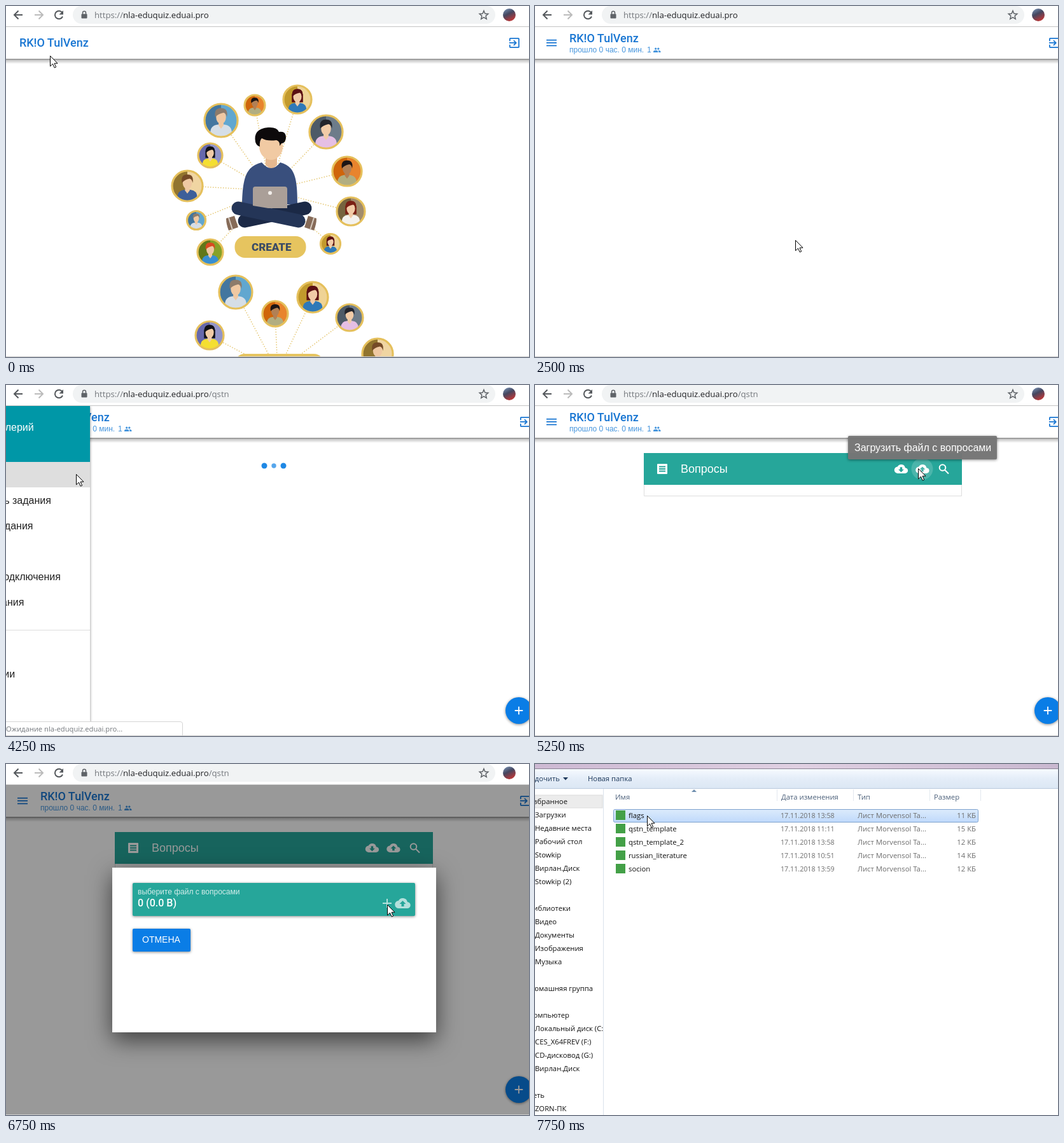
Recreate the animation shown at these times as an HTML page. Size 822 by 552 pixels, loop 8000 ms.

```html
<!DOCTYPE html>
<html lang="ru">
<head>
<meta charset="utf-8">
<title>Quiz walkthrough</title>
<style>
  html, body { margin: 0; width: 100%; height: 100%; overflow: hidden; background: #fff; }
  svg { display: block; width: 822px; height: 552px; }
  text { font: 16px "Liberation Sans", Arial, sans-serif; }
  .rob { font-family: Roboto, sans-serif; font-weight: 500; }
  .title { font-size: 18px; fill: #1976d2; }
  .small { font-size: 12px; }
  .url { font: 13.2px "Open Sans", sans-serif; fill: #74787d; }
  .win text { font: 11.3px "Open Sans", sans-serif; }
  .blue { fill: #1976d2; }
  .white { fill: #fff; }
  .teal { fill: #26a69a; }
  .btn { fill: #0a7de6; }
  .lift { filter: drop-shadow(0 1px 2px #0007); }
  .float { filter: drop-shadow(0 12px 18px #0009); }
  .line { fill: none; stroke-width: 2; }
</style>
</head>
<body>
<svg id="stage" viewBox="0 0 822 552">
  <defs>
    <linearGradient id="shade" x2="0" y2="1"><stop stop-color="#000" stop-opacity=".5"/><stop offset=".3" stop-color="#000" stop-opacity=".22"/><stop offset="1" stop-color="#000" stop-opacity="0"/></linearGradient>
    <linearGradient id="photo" x2=".5" y2="1"><stop stop-color="#7d9cc0"/><stop offset=".5" stop-color="#45465f"/><stop offset="1" stop-color="#b5383a"/></linearGradient>
    <linearGradient id="bar" x2="0" y2="1"><stop stop-color="#f6faff"/><stop offset=".5" stop-color="#e4edf8"/><stop offset="1" stop-color="#dce7f4"/></linearGradient>
    <linearGradient id="pick" x2="0" y2="1"><stop stop-color="#dcebfc"/><stop offset="1" stop-color="#bfd9fb"/></linearGradient>
    <linearGradient id="strip"><stop stop-color="#cdb9d3"/><stop offset=".5" stop-color="#e0d0e2"/><stop offset="1" stop-color="#c9b8d0"/></linearGradient>
    <path id="menu" d="M3 18h18v-2H3zm0-5h18v-2H3zm0-7v2h18V6z"/>
    <path id="exit" d="M10.1 15.6 11.5 17l5-5-5-5-1.4 1.4L12.7 11H3v2h9.7zM19 3H5a2 2 0 0 0-2 2v4h2V5h14v14H5v-4H3v4a2 2 0 0 0 2 2h14a2 2 0 0 0 2-2V5a2 2 0 0 0-2-2z"/>
    <path id="up" d="M19.4 10A7.5 7.5 0 0 0 5.4 8 6 6 0 0 0 6 20h13a5 5 0 0 0 .4-10zM14 13v4h-4v-4H7l5-5 5 5z"/>
    <path id="down" d="M19.4 10A7.5 7.5 0 0 0 5.4 8 6 6 0 0 0 6 20h13a5 5 0 0 0 .4-10zM17 13l-5 5-5-5h3V9h4v4z"/>
    <path id="plus" d="M19 13h-6v6h-2v-6H5v-2h6V5h2v6h6z"/>
    <g id="people"><circle cx="8" cy="8" r="3"/><circle cx="16" cy="8" r="3"/><path d="M1 19v-2.5c0-4.6 14-4.6 14 0V19zM17 19v-3q0-1.5-1.5-3c3 0 7.500 1 7.500 3.500V19z"/></g>
    <g id="exitIcon" class="blue"><use href="#exit" transform="translate(-10.700 -10.700) scale(.89)"/></g>
  </defs>

  <rect width="822" height="552" fill="#fff"/>

  <g data-on="0 8">
    <g id="home"></g>
    <rect y="33" width="822" height="50" fill="#fff"/>
    <rect y="83" width="822" height="8" fill="url(#shade)"/>
    <text class="rob title" x="21" y="64">RK!O TulVenz</text>
    <use href="#exitIcon" x="799" y="58"/>
  </g>

  <g data-on="9 27">
    <rect y="83" width="822" height="8" fill="url(#shade)"/>
    <use class="blue" href="#menu" transform="translate(15.300 47.300) scale(.89)"/>
    <text class="rob title" x="54" y="57">RK!O TulVenz</text>
    <g fill="#4796dd">
      <text class="small" x="54" y="73">прошло 0 час. 0 мин.</text>
      <text class="small" x="176" y="73">1</text>
      <use href="#people" transform="translate(185.500 63) scale(.52)"/>
    </g>
    <use href="#exitIcon" x="816" y="58"/>
  </g>

  <g data-on="17 17" fill="#1e88e5">
    <circle cx="406" cy="127" r="4.500"/><circle cx="421" cy="127" r="3.700" opacity=".75"/><circle cx="436" cy="127" r="4.500"/>
  </g>

  <g data-on="18 27">
    <path d="M171.500 157v17.500h499V157" fill="#fff" stroke="#ddd"/>
    <rect class="teal" x="171" y="107" width="500" height="50"/>
    <g class="white">
      <rect x="192" y="124" width="16" height="16" rx="1"/>
      <path class="line" stroke="#26a69a" d="M195 128.500h10m-10 3.500h10m-10 3.500h10"/>
      <text x="229" y="138" style="font-size:18px">Вопросы</text>
      <circle data-on="20 22" cx="608.500" cy="132" r="17" opacity=".17"/>
      <use href="#down" transform="translate(565 121.500) scale(.87)"/>
      <use href="#up" transform="translate(598.500 121.500) scale(.87)"/>
    </g>
    <path class="line" stroke="#fff" d="M644 133.500l6 6"/>
    <circle class="line" stroke="#fff" cx="640.500" cy="130" r="4.800"/>
  </g>

  <g data-on="17 27">
    <circle class="btn lift" cx="806" cy="512" r="21"/>
    <use class="white" href="#plus" transform="translate(795.200 501.200) scale(.9)"/>
  </g>

  <g data-on="21 22">
    <rect class="lift" x="492" y="80" width="234" height="37" rx="2" fill="#777" fill-opacity=".96"/>
    <text class="white" x="502" y="104">Загрузить файл с вопросами</text>
  </g>

  <rect id="veil" y="33" width="822" height="519"/>

  <g id="modal">
    <rect class="float" x="167" y="163" width="509" height="259" fill="#fff"/>
    <rect class="teal lift" x="199" y="187" width="444" height="52" rx="2"/>
    <g class="white">
      <text class="small" x="207" y="205" opacity=".8">выберите файл с вопросами</text>
      <text class="rob" x="207" y="224">0 (0.0 B)</text>
      <use href="#plus" transform="translate(587 207)" opacity=".65"/>
      <use href="#up" transform="translate(611.500 207)" opacity=".65"/>
    </g>
    <rect class="btn lift" x="199" y="259" width="91" height="36" rx="2"/>
    <text class="white" x="214" y="281" style="font-size:14px">ОТМЕНА</text>
  </g>

  <g id="drawer">
    <rect class="lift" y="33" width="300" height="519" fill="#fff"/>
    <rect y="33" width="300" height="88" fill="#0097a7"/>
    <text class="white" x="89" y="72">Зорнев Валерий</text>
    <rect data-on="16 17" y="121" width="300" height="40" fill="#dedede"/>
    <rect y="385" width="300" height="1" fill="#ddd"/>
    <g id="items" fill="#222"></g>
  </g>

  <g data-on="17 18">
    <path d="M-1 529.500H274q3.500 0 3.500 3.500V553H-1z" fill="#fff" stroke="#d5d5d5"/>
    <text class="url" y="545" style="font-size:11.200px">Ожидание nla-eduquiz.eduai.pro...</text>
  </g>

  <g data-on="0 27">
    <rect width="822" height="32" fill="#fff"/>
    <rect y="32" width="822" height="1" fill="#c4c4c4"/>
    <rect x="105" y="0" width="664" height="28" rx="14" fill="#f1f3f4"/>
    <path class="line" stroke="#54585c" d="M26 14H13.500M19.500 7.500 13 14l6.500 6.500M88.500 10.500A6.300 6.300 0 1 0 89 16.500"/>
    <path fill="#54585c" d="M90 7v6.500h-6.500z"/>
    <path class="line" stroke="#bbb" d="M45 14h12.500M51.500 7.500 58 14l-6.500 6.500"/>
    <rect x="118.500" y="12.500" width="9" height="7" rx="1" fill="#5f6368"/>
    <path fill="none" stroke="#5f6368" stroke-width="1.500" d="M120.500 13v-2.300a2.500 2.500 0 0 1 5 0V13"/>
    <text class="url" x="139" y="19">https://<tspan fill="#202124">nla-eduquiz.eduai.pro</tspan><tspan data-on="17 27">/qstn</tspan></text>
    <path fill="none" stroke="#5f6368" stroke-width="1.500" d="M751 7.500l1.900 4.500 4.900.4-3.700 3.200 1.100 4.800-4.200-2.600-4.200 2.600 1.100-4.800-3.700-3.200 4.900-.4z"/>
    <circle cx="791" cy="14" r="10" fill="url(#photo)"/>
    <rect y="551" width="822" height="1" fill="#ccc"/>
  </g>

  <g class="win" data-on="28 31">
    <rect width="822" height="552" fill="#fff"/>
    <rect width="822" height="8" fill="url(#strip)"/>
    <rect y="7" width="822" height="1" fill="#8b8494"/>
    <rect y="8" width="822" height="30" fill="url(#bar)"/>
    <rect y="38" width="822" height="1" fill="#b9c9de"/>
    <g fill="#1e395b">
      <text x="39" y="27" text-anchor="end">Упорядочить</text>
      <path d="M44 21h8l-4 4.500z"/>
      <text x="83" y="27">Новая папка</text>
    </g>
    <rect y="49" width="106" height="20" fill="#ececec" stroke="#dcdcdc"/>
    <g id="tree" fill="#111"></g>
    <rect x="107" y="39" width="715" height="513" fill="#fff"/>
    <rect x="107" y="39" width="1" height="513" fill="#dbe3ec"/>
    <path stroke="#e2e8ef" d="M380.500 40v18m120-18v18m120-18v18m80-18v18"/>
    <path fill="#6d8dad" d="M246 44h8l-4-4z"/>
    <rect id="pickRow" x="123.500" y="71.500" width="573" height="20" rx="2" fill="url(#pick)" stroke="#7da2ce"/>
    <g id="files"></g>
  </g>

  <g id="cursor" stroke="#000" fill="#fff" stroke-linejoin="round">
    <path id="arrow" d="M.5.500v16.300l4-3.700 2.700 6 2.500-1.100L7 12.200h5z"/>
    <path id="hand" d="M-1.500 13V1.500q0-1.500 1.500-1.500t1.500 1.500V8q3-2 3.500.5 2.500-1.200 3 .8 2.500-.6 2.500 1.700v4.500L8.500 21.500H0L-5.500 14q-1.200-2.500.8-2.500z"/>
  </g>
</svg>
<script>
const $ = id => document.getElementById(id);
const text = (x, y, s, more = '') => `<text x="${x}" y="${y}" ${more}>${s}</text>`;

// looks: left and right background, hair, skin, shirt, long hair
const looks = {
  boy:    ['#43769f', '#61a7d0', '#8c7b6b', '#efc8a2', '#d5dee7', 0],
  curly:  ['#cf650b', '#e8842d', '#1c1515', '#b28055', '#b2ae80', 0],
  bob:    ['#c29a2d', '#efd395', '#5b1013', '#f1cba7', '#2e79b8', 1],
  lady:   ['#4d5a67', '#6d7c8a', '#23242b', '#f1cba7', '#e5bfe4', 0],
  fringe: ['#6668ac', '#9294c9', '#111118', '#f1cba7', '#f4df31', 1],
  man:    ['#91742f', '#f0d5a2', '#754a27', '#efc8a2', '#3d5f9a', 0],
  red:    ['#76643f', '#a28c6c', '#7a2015', '#f1cba7', '#f4f2ee', 1],
  ginger: ['#617719', '#87a127', '#d84a20', '#efc8a2', '#398fd0', 0]
};
const people = [
  ['boy', 338, 180, 26], ['curly', 391, 156, 16], ['bob', 458, 147, 22], ['lady', 503, 198, 26],
  ['fringe', 321, 235, 19], ['man', 285, 283, 24], ['curly', 536, 260, 23], ['red', 542, 323, 22],
  ['boy', 299, 337, 14.5], ['ginger', 321, 387, 20], ['bob', 510, 374, 15.500]
];
const team = [
  ['boy', 361, 450, 26], ['curly', 423, 484, 20], ['bob', 482, 458, 24],
  ['lady', 540, 490, 21], ['fringe', 320, 518, 22], ['man', 584, 547, 24]
];

function avatar([look, x, y, r]) {
  const [left, right, hair, skin, shirt, long] = looks[look];
  return `<g transform="translate(${x} ${y}) scale(${r / 20})">
    <circle r="20" fill="${right}"/><path d="M0-20a20 20 0 0 0 0 40z" fill="${left}"/>
    ${long ? `<path d="M-8 4V-7Q-7-15 0-15T8-7V4z" fill="${hair}"/>` : ''}
    <path d="M-13 15Q-13 6-4 5H4Q13 6 13 15Q0 25-13 15z" fill="${shirt}"/>
    <path d="M-3 0h6v6l-3 4-3-4z" fill="${skin}"/><ellipse cy="-4" rx="6" ry="8" fill="${skin}"/>
    <path d="M-7-4Q-9-15 0-15T7-4Q6-9 3-9.500-4-8-7-4z" fill="${hair}"/>
    <circle r="20" fill="none" stroke="#e5c05c" stroke-width="${64 / r}"/></g>`;
}
const cluster = (list, hx, hy) =>
  list.map(([, x, y]) => `<path d="M${x} ${y}L${hx} ${hy}" stroke="#e5c66f" stroke-width="1.500" stroke-dasharray="1.500 2.500"/>`).join('')
  + list.map(avatar).join('');

const sitter = `
  <path d="M408 234h18v16l-9 8-9-8z" fill="#e5b88f"/>
  <ellipse cx="416.500" cy="221" rx="18.500" ry="21" fill="#f1caa3"/>
  <path d="M392 214Q388 193 412 191 426 190 429 198 440 196 440 207 439 216 433 216L430 220Q431 213 425 211 410 213 402 208 398 212 399 221 394 220 392 214z" fill="#0d0a0b"/>
  <path d="M371 312C372 268 378 252 402 246Q417 264 431 246C454 252 458 270 458 312z" fill="#394f7d"/>
  <path d="M346 334l13-4 6 18-15 5q-4-10-4-19zM488 334l-13-4-6 18 15 5q4-10 4-19z" fill="#866b58"/>
  <path d="M350 333l6 19M484 333l-6 19" stroke="#d6cbc0" stroke-width="2"/>
  <path d="M470 318 375 338" stroke="#1b2946" stroke-width="21" stroke-linecap="round"/>
  <path d="M365 318 460 338" stroke="#243557" stroke-width="21" stroke-linecap="round"/>
  <path d="M388 314v-26q0-4 4-4h46q4 0 4 4v30h-30z" fill="#aa9f98"/>
  <circle cx="415" cy="294" r="3" fill="#f2eeea"/>
  <rect x="359.500" y="362" width="112" height="34" rx="16" fill="#e6c45f"/>`
  + text(386, 385, 'CREATE', 'fill="#3b4b65" style="font:900 17px Roboto,sans-serif"');

$('home').innerHTML = cluster(people, 415, 290) + sitter + cluster(team, 427, 575)
  + '<rect x="359" y="547" width="141" height="40" rx="16" fill="#e6c45f"/>';

$('items').innerHTML = ['Вопросы', 'Редактировать задания', 'Выполнить задания', 'Отчет',
  'Ссылки для подключения', 'Выйти из задания'].map((s, i) => text(63, 147 + 40 * i, s)).join('')
  + text(63, 460, 'Текущие сессии');

// group headings are cut by the left edge and carry their right end
const tree = [['Избранное', 51], 'Загрузки', 'Недавние места', 'Рабочий стол', 'Stowkip', 'Вирлан.Диск',
  'Stowkip (2)', '', ['Библиотеки', 56], 'Видео', 'Документы', 'Изображения', 'Музыка', '',
  ['Домашняя группа', 91], '', ['Компьютер', 54], 'Локальный диск (C:)', 'CES_X64FREV (F:)',
  'CD-дисковод (G:)', 'Вирлан.Диск', '', ['Сеть', 15], 'ZORN-ПК'];
$('tree').innerHTML = tree.map((s, i) => Array.isArray(s)
  ? text(s[1], 63 + 21 * i, s[0], 'text-anchor="end"') : text(0, 63 + 21 * i, s)).join('');

const files = [['flags', '13:58', 11], ['qstn_template', '11:11', 15], ['qstn_template_2', '13:58', 12],
  ['russian_literature', '10:51', 14], ['socion', '13:59', 12]];
const heads = [['Имя', 126], ['Дата изменения', 387], ['Тип', 507], ['Размер', 627]];
$('files').innerHTML = heads.map(([s, x]) => text(x, 56, s, 'fill="#4c607a"')).join('')
  + files.map(([name, time, size], i) => {
    const y = 85 + 21 * i, grey = 'fill="#6d6d6d"';
    return `<rect x="127" y="${y - 12}" width="15" height="15" fill="#43a047"/>`
      + text(147, y, name, 'fill="#111"')
      + text(386, y, '17.11.2018 ' + time, grey + ' style="font-size:10.700px"')
      + text(507, y, 'Лист Morvensol Ta...', grey)
      + text(693, y, size + ' КБ', grey + ' text-anchor="end"');
  }).join('');

const STEP = 250, COUNT = 32;
const path = [
  [69, 78], [76, 80], [60, 58], [34, 28], [14, 6], [2, 1], [150, 140], [320, 290],
  [413, 368], [409, 368], [409, 368], [270, 250], [90, 110], [26, 56], [43, 68], [90, 110],
  [114, 140], [110, 140], [200, 170], [420, 160], [606, 131], [602, 131], [602, 131], [602, 131],
  [604, 160], [602, 200], [600, 222], [599, 221], [599, 221], [420, 150], [176, 81], [176, 81]
];
const hands = [8, 13, 14, 16, 20];
const slide = { 14: -82, 15: 0, 16: 0, 17: -168 };
const timed = [...document.querySelectorAll('[data-on]')].map(el => [el, ...el.dataset.on.split(' ').map(Number)]);
const show = (el, on) => { el.style.display = on ? '' : 'none'; };

function draw(n) {
  for (const [el, from, to] of timed) show(el, n >= from && n <= to);
  show($('drawer'), n in slide);
  $('drawer').setAttribute('transform', `translate(${slide[n] ?? 0})`);
  const modal = n < 23 || n > 27 ? 0 : n === 23 ? .5 : 1;
  $('modal').style.opacity = modal;
  $('veil').style.opacity = .4 * (n >= 14 && n <= 16 ? 1 : modal);
  $('pickRow').style.opacity = n === 31 ? 1 : n === 30 ? .4 : 0;
  const hand = hands.includes(n);
  show($('hand'), hand);
  show($('arrow'), !hand);
  $('cursor').setAttribute('transform', `translate(${path[n]})`);
}

let last = -1;
function tick() {
  const n = Math.floor(performance.now() / STEP) % COUNT;
  if (n !== last) draw(last = n);
  requestAnimationFrame(tick);
}
tick();
</script>
</body>
</html>
```
